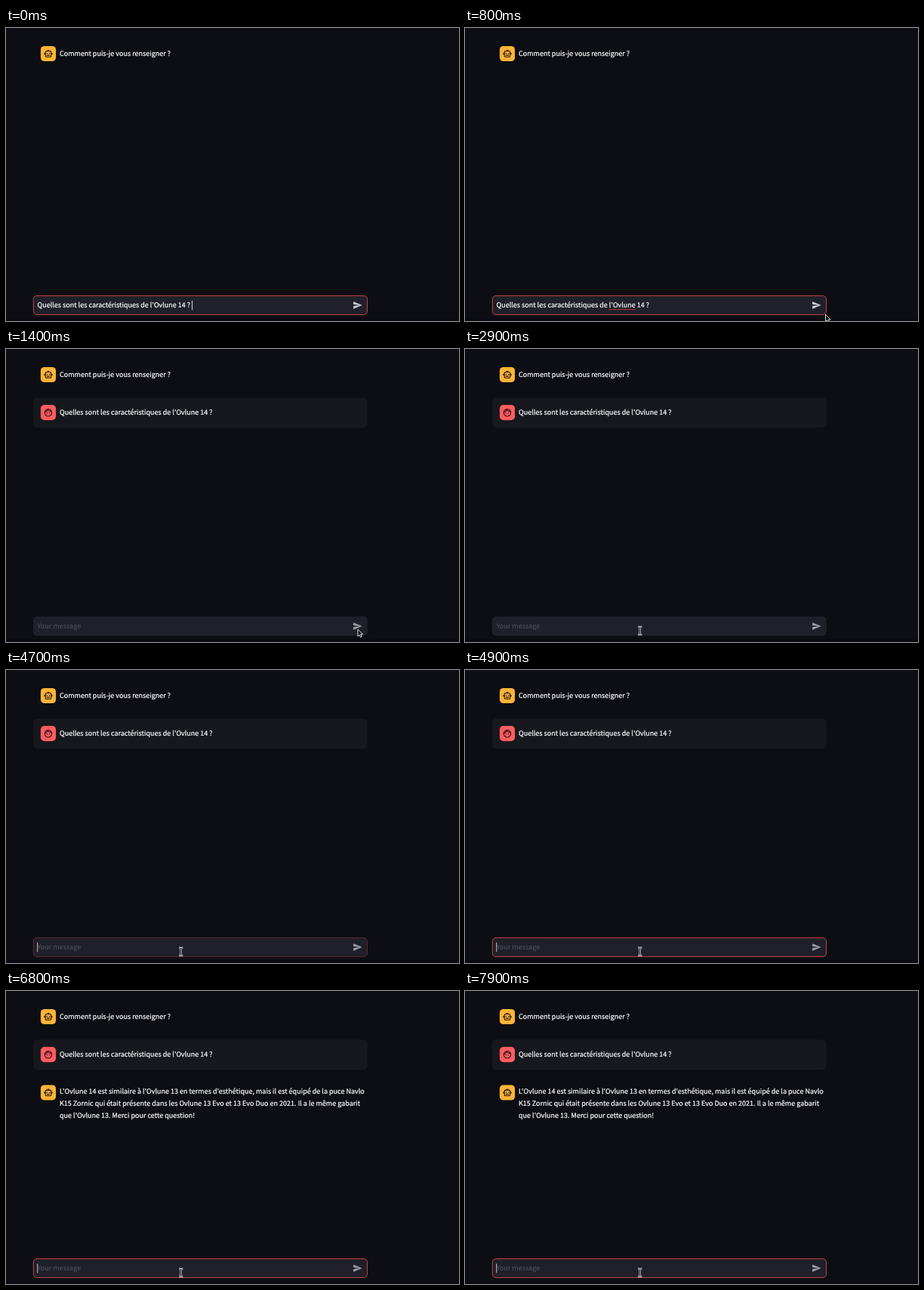
An HTML page that plays this animation: 600 by 388 pixels, repeating every 8 s.

```html
<!DOCTYPE html>
<html lang="fr">
<head>
<meta charset="utf-8">
<title>Chat</title>
<style>
  html, body { margin: 0; width: 100%; height: 100%; overflow: hidden; background: #0d0e13; }
  svg { display: block; width: 600px; height: 388px; }
  text {
    font: 9.02px "Noto Sans CJK JP", "Noto Sans CJK SC", "Noto Sans CJK", "Open Sans", sans-serif;
    fill: #fafafc; stroke: #fafafc; stroke-width: .22px;
    text-rendering: geometricPrecision; white-space: pre;
  }
  #placeholder { fill: #53545d; stroke: none; }
</style>
</head>
<body>
<svg viewBox="0 0 600 388">
  <defs>
    <g id="bot">
      <rect width="20.2" height="20.2" rx="5" fill="#ffb438"/>
      <g transform="translate(3.8 3.8) scale(.525)" fill="#1c1608">
        <rect x="5" y="6" width="14" height="14" rx="1" fill="none" stroke="#1c1608" stroke-width="2"/>
        <path d="M9 5a3 3 0 0 1 6 0zM4 9a3 3 0 0 0 0 6zM20 9a3 3 0 0 1 0 6zM8 15h8v2H8z"/>
        <circle cx="9" cy="11.5" r="1.5"/><circle cx="15" cy="11.5" r="1.5"/>
      </g>
    </g>
    <g id="user">
      <rect width="20.2" height="20.2" rx="5" fill="#ff5d60"/>
      <g transform="translate(3.8 3.8) scale(.525)" fill="#230c10">
        <g fill="none" stroke="#230c10" stroke-width="2">
          <circle cx="12" cy="12" r="9"/>
          <path d="M3.5 11Q9 9.5 10.5 4.5Q14 9.5 20.5 9"/>
        </g>
        <circle cx="9" cy="13" r="1.3"/><circle cx="15" cy="13" r="1.3"/>
      </g>
    </g>
    <path id="ibeam" d="M-2.6 -5.2Q0 -5.2 0 -3.6V3.6Q0 5.2 -2.6 5.2M2.6 -5.2Q0 -5.2 0 -3.6V3.6Q0 5.2 2.6 5.2" fill="none"/>
  </defs>

  <rect width="600" height="388" fill="#0d0e13"/>
  <rect y="384" width="600" height="4" fill="#0b0a12"/>

  <use href="#bot" x="45.9" y="23.9"/>
  <text x="71" y="37.4">Comment puis-je vous renseigner ?</text>

  <g id="question">
    <rect x="36" y="64.5" width="442.7" height="39.7" rx="5" fill="#16181d"/>
    <use href="#user" x="45.9" y="74.1"/>
    <text x="71" y="87.3" class="ask"></text>
  </g>

  <g id="answer">
    <use href="#bot" x="45.9" y="124.4"/>
    <text x="71" y="135.5">L'Ovlune 14 est similaire à l'Ovlune 13 en termes d'esthétique, mais il est équipé de la puce Navlo</text>
    <text x="71" y="151.6">K15 Zornic qui était présente dans les Ovlune 13 Evo et 13 Evo Duo en 2021. Il a le même gabarit</text>
    <text x="71" y="167.7">que l'Ovlune 13. Merci pour cette question!</text>
  </g>

  <rect x="36" y="354.3" width="442.7" height="25.5" rx="5" fill="#1f2029"/>
  <rect id="focus" x="36.3" y="354.6" width="442.2" height="25" rx="4.7" fill="none" stroke="#bd434a"/>
  <text id="draft" x="41.5" y="370.4" class="ask"></text>
  <path id="misspelt" fill="none" stroke="#e8434a" stroke-width="1.2" stroke-dasharray="1.2 .8"/>
  <text id="placeholder" x="41.5" y="370.4">Your message</text>
  <rect id="caret" y="361" width=".9" height="12.4" fill="#f0f0f2"/>
  <path id="send" transform="translate(459 360.5) scale(.55)" d="M2 21L23 12 2 3V10l15 2-15 2z"/>

  <path id="arrow" d="M0 0V9.2L2.1 7.3 3.5 10.5 5.1 9.8 3.7 6.7H6.6Z" fill="#050507" stroke="#f4f4f6" stroke-width=".9"/>
  <g id="beam">
    <use href="#ibeam" stroke="#e4e4e8" stroke-width="2.4"/>
    <use href="#ibeam" stroke="#16161c" stroke-width=".8"/>
  </g>
</svg>
<script>
const LOOP = 8000, STEP = 100, BLINK = 1000;
const SPELLCHECKED = 300, ENTERED = 500, SENT = 1300, FOCUSED = 4600, ANSWERED = 5700;
const ASK = "Quelles sont les caractéristiques de l'Ovlune 14 ? ";
const OUTSIDE = [481, 390], CORNER = [477.5, 379.3], BUTTON = [466, 371.2], FIELD = [231.7, 373];
const $ = id => document.getElementById(id);

const clamp = v => Math.min(1, Math.max(0, v));
const ramp = (t, start, end) => clamp((t - start) / (end - start));
const ease = p => p * p * (3 - 2 * p);
const glide = (from, to, p) => from.map((v, i) => v + (to[i] - v) * ease(p));

// Soft-edged square wave: half a period lit, half dark.
const blink = age => clamp(.5 + 2 * Math.sin(age / BLINK * 2 * Math.PI));

function pointerAt(t) {
  if (t < 850) return glide(OUTSIDE, CORNER, ramp(t, ENTERED, 800));
  if (t < 1400) return glide(CORNER, BUTTON, ramp(t, 900, 1200));
  return glide(BUTTON, FIELD, ramp(t, 1400, 1800));
}

const show = (id, on) => $(id).style.display = on ? "" : "none";

document.querySelectorAll(".ask").forEach(el => el.textContent = ASK);
const wordStart = ASK.indexOf("l'");
const wordEnd = ASK.indexOf(" ", wordStart);

function draw(t) {
  const draft = $("draft"), typing = t < SENT, focused = typing || t > FOCUSED;
  show("draft", typing);
  show("misspelt", typing && t >= SPELLCHECKED);
  show("placeholder", !typing);
  show("question", !typing);
  show("answer", t >= ANSWERED);
  show("caret", focused);

  if (typing) {
    const [left, right] = [wordStart, wordEnd].map(i => draft.getStartPositionOfChar(i).x);
    $("misspelt").setAttribute("d", `M${left} 372.6H${right}`);
  }
  $("caret").setAttribute("x", typing ? 41.5 + draft.getComputedTextLength() : 41.3);
  $("caret").style.opacity = typing ? blink(t + 100) : .85 * blink(t - FOCUSED);
  $("focus").style.opacity = typing ? 1 : ramp(t, FOCUSED, FOCUSED + 250);
  $("send").setAttribute("fill", typing ? "#cbccd1" : "#9c9da5");

  const [x, y] = pointerAt(t);
  const overText = x < 455;
  show("arrow", t >= ENTERED && !overText);
  show("beam", overText);
  for (const id of ["arrow", "beam"]) $(id).setAttribute("transform", `translate(${x} ${y})`);
}

function frame(now) {
  draw(Math.floor(now % LOOP / STEP) * STEP);
  requestAnimationFrame(frame);
}
draw(0);
requestAnimationFrame(frame);
</script>
</body>
</html>
```
